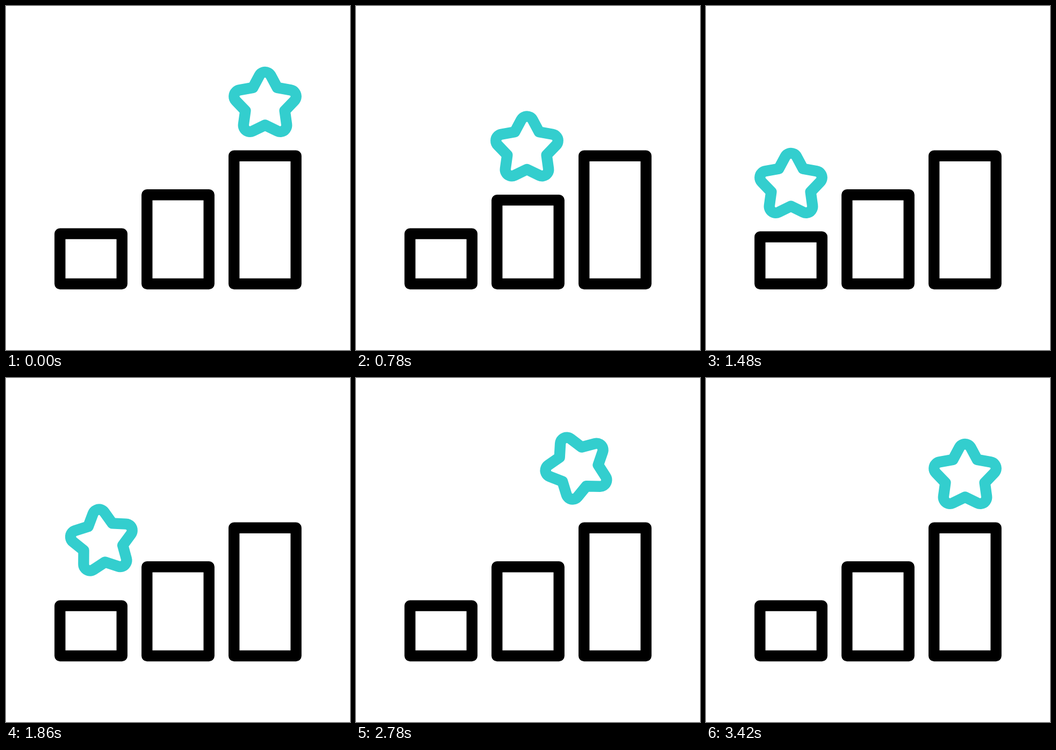
An HTML page with a canvas for the animation above (3600 ms loop, 640 by 640 pixels).

```html
<!DOCTYPE html>
<html lang="en">
<head>
<meta charset="utf-8">
<title>Star on bars</title>
<style>
  html, body { margin: 0; height: 100%; overflow: hidden; background: #fff; }
  canvas { display: block; }
</style>
</head>
<body>
<canvas id="stage" width="640" height="640"></canvas>
<script>
const ctx = document.getElementById('stage').getContext('2d');
const LOOP = 3600, START = 200, STEP = 800, FLIGHT = 400, SPIN = 415;
const TAU = Math.PI * 2, RAD = Math.PI / 180;

// Bars from left to right: left edge, top edge, and where the star rests.
const bars = [
  { x: 100.4, y: 423.6, starX: 158, starY: 328 },
  { x: 262.3, y: 351.2, starX: 318, starY: 255.5 },
  { x: 424.2, y: 278.8, starX: 482, starY: 183 }
];

// mid: share of the way covered at half time; lift, skew: shape of the arc.
const hops = [
  { from: 2, to: 1, mid: 0.545, lift: 212, skew: -215 },
  { from: 1, to: 0, mid: 0.565, lift: 75, skew: -20 },
  { from: 0, to: 1, mid: 0.6, lift: 122, skew: 0 },
  { from: 1, to: 2, mid: 0.59, lift: 46, skew: 780 }
];

const clamp = v => Math.min(1, Math.max(0, v));
const smooth = v => v * v * (3 - 2 * v);
const mix = (a, b, k) => a + (b - a) * k;

// Cubic Bezier easing (.25, .1, .25, 1).
function ease(v) {
  let lo = 0, hi = 1;
  for (let i = 0; i < 24; i++) {
    const u = (lo + hi) / 2;
    if (0.75 * u * (1 - u) + u ** 3 < v) lo = u; else hi = u;
  }
  return 0.3 * lo * (1 - lo) ** 2 + 3 * lo * lo * (1 - lo) + lo ** 3;
}

function pose(time) {
  const t = time - START;
  const n = Math.floor(t / STEP);
  const home = bars[2];
  if (!hops[n]) return { x: home.starX, y: home.starY, angle: 0, scale: 1, press: 0, bar: 2 };

  const hop = hops[n], a = bars[hop.from], b = bars[hop.to];
  const local = t - n * STEP;
  const half = clamp(local / FLIGHT) * 2;
  const p = half < 1 ? hop.mid * smooth(half) : mix(hop.mid, 1, smooth(half - 1));
  const rise = p * (1 - p) * (hop.lift + hop.skew * p ** 3);
  const landed = Math.sin(Math.PI * clamp((local - FLIGHT) / (STEP - FLIGHT)));
  const press = 10 * landed;
  return {
    x: mix(a.starX, b.starX, p),
    y: mix(a.starY, b.starY, p) - rise + press,
    angle: TAU * ease(clamp(local / SPIN)) * Math.sign(hop.to - hop.from),
    scale: n === 3 ? 1 + 0.34 * landed ** 2 : 1,
    press,
    bar: hop.to
  };
}

function drawStar({ x, y, angle, scale }) {
  ctx.save();
  ctx.translate(x, y);
  ctx.rotate(angle);
  ctx.scale(scale, scale);
  ctx.beginPath();
  for (let i = 0; i < 5; i++) {
    const tip = (i * 72 - 90) * RAD, notch = tip + 36 * RAD;
    ctx.arc(48 * Math.cos(tip), 48 * Math.sin(tip), 12, tip - 62 * RAD, tip + 62 * RAD);
    ctx.lineTo(38.5 * Math.cos(notch), 38.5 * Math.sin(notch));
  }
  ctx.closePath();
  ctx.strokeStyle = '#33cece';
  ctx.stroke();
  ctx.restore();
}

function draw(now) {
  const star = pose(now % LOOP);
  ctx.fillStyle = '#fff';
  ctx.fillRect(0, 0, 640, 640);
  ctx.lineWidth = 20.4;
  ctx.lineJoin = 'round';
  ctx.strokeStyle = '#000';
  bars.forEach((bar, i) => {
    const top = bar.y + (i === star.bar ? star.press : 0);
    ctx.strokeRect(bar.x, top, 115.4, 517 - top);
  });
  drawStar(star);
}

const begin = performance.now();
(function frame() {
  draw(performance.now() - begin);
  requestAnimationFrame(frame);
})();
</script>
</body>
</html>
```
